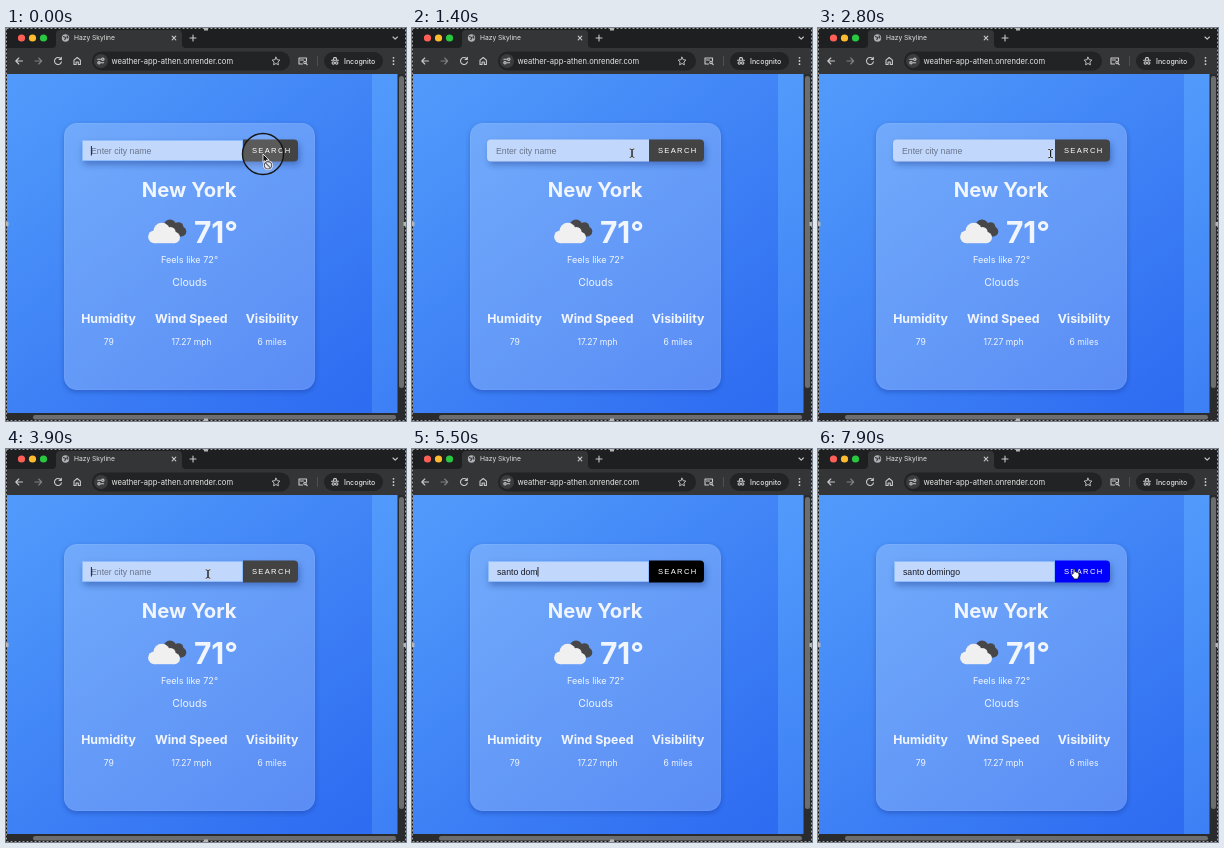
An HTML page for the animation above (8 s loop, 400 by 393 pixels).

```html
<!DOCTYPE html>
<html lang="en">
<head>
<meta charset="utf-8">
<style>
  html, body { margin: 0; width: 100%; height: 100%; overflow: hidden; background: #1e1f20; }
  svg { display: block; width: 400px; height: 393px; font-family: Inter, sans-serif; }
  .mid { text-anchor: middle; fill: #f1f5fe; }
  .bold { font-weight: 700; }
  .head { font-size: 12.3px; font-weight: 700; }
  .value { font-size: 8.6px; }
  .ui { fill: #e6e6e6; }
  .icon { fill: none; stroke: #c9c9c9; stroke-width: 1.1; stroke-linecap: round; stroke-linejoin: round; }
  .arial { font-family: "Liberation Sans", Arial, sans-serif; white-space: pre; }
</style>
</head>
<body>
<svg viewBox="0 0 400 393">
  <defs>
    <linearGradient id="sky" x1=".08" y1="0" x2=".92" y2="1">
      <stop offset="0" stop-color="#519afb"/>
      <stop offset="1" stop-color="#2e6cf1"/>
    </linearGradient>
    <filter id="cardShadow" x="-10%" y="-10%" width="120%" height="120%">
      <feGaussianBlur stdDeviation="2.5"/>
    </filter>
    <filter id="barShadow" x="-10%" y="-60%" width="120%" height="240%">
      <feGaussianBlur stdDeviation="3"/>
    </filter>
    <mask id="outsideCard">
      <path fill="#fff" d="M0 0H400V393H0Z"/>
      <rect x="58" y="95" width="251" height="267" rx="13" fill="#000"/>
    </mask>
  </defs>

  <!-- page -->
  <rect id="tile" y="45" width="366" height="340" fill="url(#sky)"/>
  <use href="#tile" x="366"/>

  <!-- card -->
  <g mask="url(#outsideCard)">
    <rect x="58" y="97" width="251" height="267" rx="13" fill="#0a2a80" opacity=".35" filter="url(#cardShadow)"/>
  </g>
  <rect x="58" y="95" width="251" height="267" rx="13" fill="#fff" opacity=".2"/>
  <rect x="58.5" y="95.5" width="250" height="266" rx="12.5" fill="none" stroke="#fff" opacity=".06"/>

  <!-- search bar -->
  <rect x="77" y="115" width="217" height="22" rx="4" fill="#12307c" opacity=".38" filter="url(#barShadow)"/>
  <path id="field" fill="#c2d7fc"/>
  <text id="entry" class="arial" y="125.8" font-size="8.7"></text>
  <path id="caret" stroke="#111" stroke-width=".9"/>
  <path id="button" d="M237 111.5H288a4 4 0 0 1 4 4V129.5a4 4 0 0 1-4 4H237Z"/>
  <text class="arial" x="246" y="125.3" font-size="7.6" letter-spacing="1.3" fill="#fff">SEARCH</text>

  <!-- weather -->
  <text class="mid bold" x="183.2" y="168.7" font-size="20.3">New York</text>
  <g fill="#47474a">
    <circle cx="164" cy="198" r="6.5"/><circle cx="172.5" cy="199" r="4.8"/>
    <circle cx="175.3" cy="203.5" r="5"/><path d="M160 199H175V208.5H160Z"/>
  </g>
  <g fill="#f0f0f0">
    <circle cx="148.5" cy="208.8" r="6.4"/><circle cx="155.8" cy="203" r="8.3"/>
    <circle cx="164.5" cy="204.3" r="5.2"/><circle cx="168.3" cy="209.5" r="5.7"/>
    <path d="M148.5 205H168.3V215.2H148.5Z"/>
  </g>
  <text class="mid bold" x="210" y="214.8" font-size="30">71°</text>
  <text class="mid" x="183.5" y="235.2" font-size="9.1">Feels like 72°</text>
  <text class="mid" x="183.7" y="258.4" font-size="10.5">Clouds</text>
  <g class="mid head">
    <text x="102.5" y="294.9">Humidity</text>
    <text x="185.2" y="294.9">Wind Speed</text>
    <text x="266" y="294.9">Visibility</text>
  </g>
  <g class="mid value">
    <text x="102.7" y="316.9">79</text>
    <text x="185.5" y="316.9">17.27 mph</text>
    <text x="266" y="316.9">6 miles</text>
  </g>

  <!-- scroll bars -->
  <path fill="#2a2b2c" d="M391.5 45H400V393H0V385H391.5Z"/>
  <rect x="393" y="48" width="5" height="312" rx="2.5" fill="#6c6d6e"/>
  <rect x="27" y="387" width="363" height="4.5" rx="2.2" fill="#6c6d6e"/>

  <!-- browser window -->
  <path fill="#1e1f20" d="M0 0H400V21H0Z"/>
  <path fill="#343536" d="M0 20H46Q50 20 50 16V6Q50 2 54 2H172Q176 2 176 6V16Q176 20 180 20H400V46H0Z"/>
  <circle cx="15.5" cy="10" r="3.6" fill="#ff5f57"/>
  <circle cx="26.5" cy="10" r="3.6" fill="#febc2e"/>
  <circle cx="37.5" cy="10" r="3.6" fill="#28c840"/>
  <circle cx="59.5" cy="10" r="3.7" fill="#aeb1b5"/>
  <path d="M57 8.5L60 9.5L58.5 12M61 7.5L62 10.5" stroke="#343536" stroke-width="1.1" fill="none"/>
  <text class="ui" x="68" y="12.4" font-size="6.7">Hazy Skyline</text>
  <rect x="86" y="23.5" width="198" height="19" rx="9.5" fill="#222324"/>
  <circle cx="95" cy="33" r="7" fill="#3b3c3e"/>
  <rect x="318" y="24" width="59" height="18" rx="9" fill="#222324"/>
  <text class="ui" x="105.5" y="35.7" font-size="7.6">weather-app-athen.onrender.com</text>
  <text class="ui" x="338" y="35.6" font-size="7" font-weight="500">Incognito</text>
  <g class="icon">
    <path d="M166.2 8.2l3.6 3.6m0-3.6l-3.6 3.6M184 10h6m-3-3v6M387 9l2.2 2.2L391.4 9"/>
    <path d="M16.5 33H9.8m3-3l-3 3 3 3"/>
    <path d="M29 33h6.7m-3-3l3 3-3 3" stroke="#808080"/>
    <path d="M55 31.2a3.5 3.5 0 1 0 .4 2.6M55.3 29.3v2.2h-2.2"/>
    <path d="M68 32.2l3.2-2.7 3.2 2.7v4.3h-2.1v-2.5h-2.2v2.5H68Z"/>
    <path d="M91.8 31.2h2.8M97.6 34.8h-2.4"/>
    <circle cx="96.8" cy="31.2" r="1.2"/><circle cx="93" cy="34.8" r="1.2"/>
    <path d="M270 29.2l1.2 2.5 2.7.4-2 1.9.5 2.8-2.4-1.3-2.4 1.3.5-2.8-2-1.9 2.7-.4Z" stroke-width=".9"/>
    <path d="M300.5 33V30h-7.5v6h3.5M294.5 32h3"/>
    <circle cx="299" cy="34.5" r="1.2"/><path d="M300 35.5l1.2 1.2"/>
    <path d="M311.5 28.5v9" stroke="#5b5c5e" stroke-width=".7"/>
    <path d="M325.5 32.3h7M327.3 31.8l.6-2.2h2.2l.6 2.2"/>
    <circle cx="327.3" cy="35" r="1.2"/><circle cx="330.7" cy="35" r="1.2"/>
  </g>
  <g fill="#d0d0d0"><circle cx="387.5" cy="29.8" r=".9"/><circle cx="387.5" cy="33" r=".9"/><circle cx="387.5" cy="36.2" r=".9"/></g>

  <!-- selection frame -->
  <rect x=".5" y=".5" width="399" height="392" fill="none" stroke="#111"/>
  <rect x=".5" y=".5" width="399" height="392" fill="none" stroke="#a0a0a0" stroke-dasharray="2 2"/>
  <g fill="#b5b5b5"><path d="M198 0h4v2.5h-4ZM198 390.5h4v2.5h-4ZM0 194h2.5v4H0ZM397.5 194h2.5v4h-2.5Z"/></g>

  <!-- pointer -->
  <g id="pointer">
    <circle id="ring" r="20.5" fill="#fff" fill-opacity=".12" stroke="#161616" stroke-width="1.4"/>
    <g id="beam" fill="none" stroke-linecap="round">
      <path id="bar" d="M-2-4.2Q0-4.2 0-3V3Q0 4.2-2 4.2M2-4.2Q0-4.2 0-3V3Q0 4.2 2 4.2" stroke="#fff" stroke-opacity=".6" stroke-width="2"/>
      <path d="M-2-4.2Q0-4.2 0-3V3Q0 4.2-2 4.2M2-4.2Q0-4.2 0-3V3Q0 4.2 2 4.2" stroke="#111" stroke-width=".9"/>
    </g>
    <g id="banned">
      <path d="M0 0V8.3L2 6.6 3.2 9.3 4.6 8.7 3.4 6H6Z" fill="#111" stroke="#fff" stroke-width=".8"/>
      <circle cx="5" cy="11.3" r="3.9" fill="#dfe3ea" stroke="#fff" stroke-width="2"/>
      <circle cx="5" cy="11.3" r="3.7" fill="#e4e7ee" stroke="#55585e" stroke-width="1.1"/>
      <path d="M2.5 8.8l5 5" stroke="#55585e" stroke-width="1.1"/>
    </g>
    <path id="hand" fill="#fff" stroke="#111" stroke-width=".8" stroke-linejoin="round"
      d="M-.9 4V-.5Q0-1.6.9-.5V2.2Q2-.0 2.5 2.4 3.6 1.6 3.9 3 5 2.6 5 4V5.6Q4.8 7 4 8V9H-.4V8L-3 5Q-3.2 3.6-2 4Z"/>
  </g>
</svg>
<script>
const $ = id => document.getElementById(id);
const LOOP = 8000, STEP = 100;
const QUERY = "santo domingo", TYPE_START = 4600, KEY_MS = 110;
const TYPE_END = TYPE_START + (QUERY.length - 1) * KEY_MS;
const BLUR = 200, FOCUS = 3500;

// time, x, y
const path = [
  [0, 257, 126], [300, 257, 126], [700, 214, 125], [1200, 214, 125], [2000, 252.5, 126],
  [2500, 252.5, 126], [3200, 202, 125], [4500, 202, 125],
  [6900, 203, 119], [7200, 209, 115], [7700, 256, 121], [8000, 256, 121]
];

function pointerAt(t) {
  const i = path.findIndex(p => p[0] > t);
  const [t0, x0, y0] = path[i - 1], [t1, x1, y1] = path[i];
  const k = (t - t0) / (t1 - t0), e = k * k * (3 - 2 * k);
  return [x0 + (x1 - x0) * e, y0 + (y1 - y0) * e];
}

const show = (id, on) => $(id).setAttribute("visibility", on ? "visible" : "hidden");

function drawField(t, typed) {
  const focused = t < BLUR || t >= FOCUS;
  const x = focused ? 85 : 84;
  const field = $("field"), entry = $("entry");
  field.setAttribute("d", focused
    ? "M76.5 112.5H236.5V132.5H76.5Z"
    : "M79 111.5H237V133.5H79a4 4 0 0 1-4-4V115.5a4 4 0 0 1 4-4Z");
  field.setAttribute("stroke", focused ? "#8dbcff" : "none");
  entry.setAttribute("x", x);
  entry.setAttribute("fill", typed ? "#151a22" : "#68758c");
  entry.textContent = typed || "Enter city name";

  const typing = t >= TYPE_START && t < TYPE_END;
  const blinkStart = t < BLUR ? 0 : t < TYPE_START ? FOCUS : TYPE_END;
  const lit = typing || (t - blinkStart) % 1000 < 500;
  const caretX = x + (typed ? entry.getComputedTextLength() : 0) + .4;
  $("caret").setAttribute("d", `M${caretX} 118V127.5`);
  show("caret", focused && lit);
}

function drawPointer(t, x, y, overButton, enabled) {
  const visible = t < 4500 || t >= 6900;
  $("pointer").setAttribute("transform", `translate(${x} ${y})`);
  show("ring", t < 300 || (t >= 3400 && t < 3600));
  show("beam", visible && !overButton);
  show("banned", visible && overButton && !enabled);
  show("hand", visible && overButton && enabled);
}

function draw(now) {
  const t = Math.floor(now % LOOP / STEP) * STEP;
  const count = Math.max(0, Math.floor((t - TYPE_START) / KEY_MS) + 1);
  const typed = QUERY.slice(0, count);
  const [x, y] = pointerAt(t);
  const overButton = x >= 237;
  $("button").setAttribute("fill", !typed ? "#434343" : overButton ? "#0000ff" : "#000");
  drawField(t, typed);
  drawPointer(t, x, y, overButton, !!typed);
}

const start = performance.now();
function tick() {
  draw(performance.now() - start);
  requestAnimationFrame(tick);
}
tick();
</script>
</body>
</html>
```
